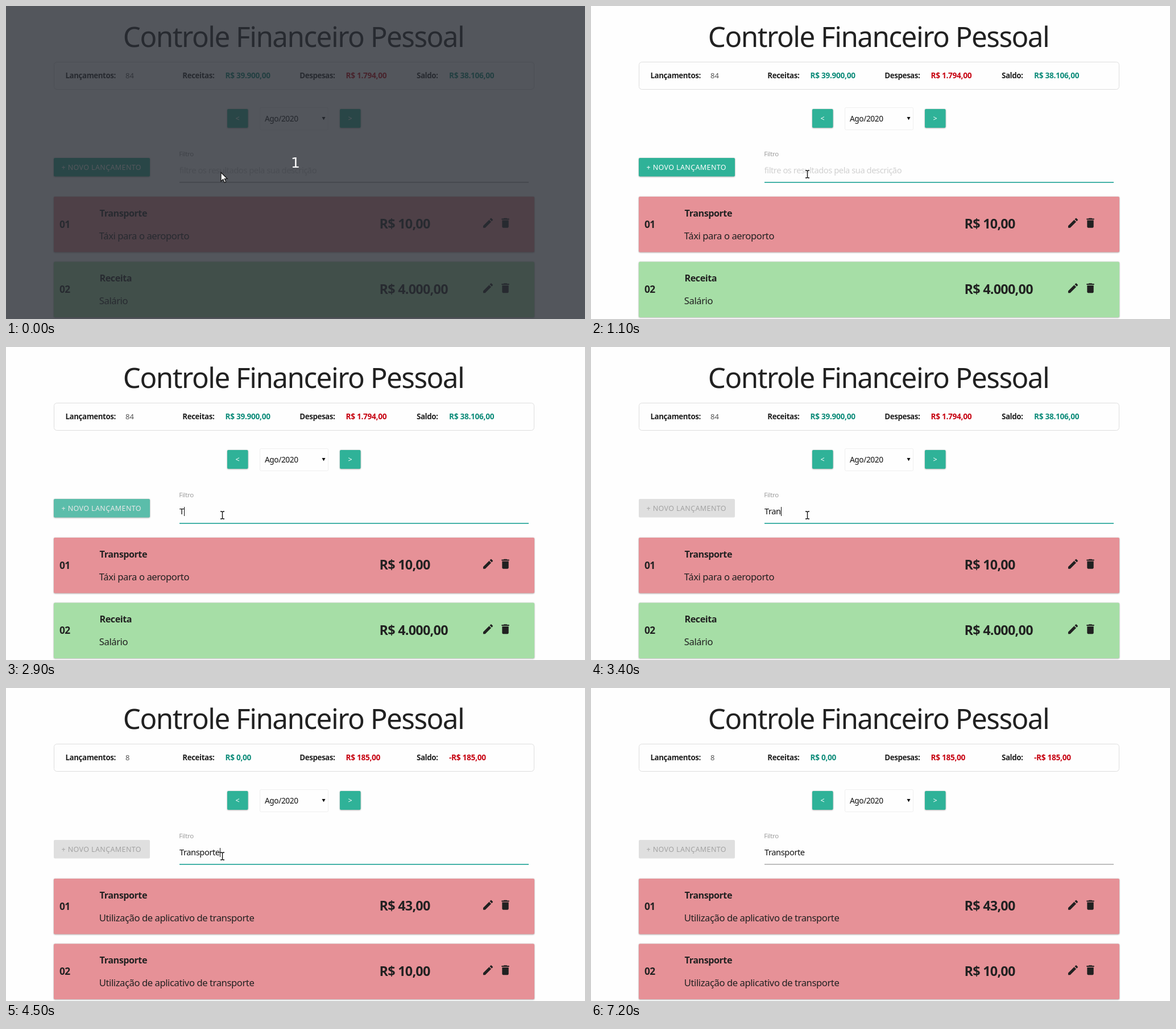
Animation of 1018 by 550 pixels, one loop 7.4 s. Source, as an HTML page:

```html
<!DOCTYPE html>
<html lang="pt-BR">
<head>
<meta charset="utf-8">
<title>Controle Financeiro Pessoal</title>
<style>
  html, body { margin: 0; width: 100%; height: 100%; overflow: hidden; background: #fefefe; }
  svg { display: block; }
  text { font-family: "Noto Sans", "Open Sans", sans-serif; letter-spacing: -.03em; fill: #212121; white-space: pre; }
  .bold, .money, .value, .index { font-weight: 700; }
  .title { font-size: 49.25px; }
  .label { font-size: 13.3px; }
  .money { font-size: 13.6px; letter-spacing: -.02em; }
  .count { font-size: 13px; letter-spacing: 0; fill: #555; }
  .button { font-size: 12.5px; letter-spacing: .03em; fill: #fff; }
  .select { font-size: 13.7px; fill: #111; }
  .hint { font-size: 11.5px; fill: #9e9e9e; }
  .input { font-size: 14.7px; fill: #111; }
  .item { font-size: 16.2px; }
  .note { font-size: 16.6px; letter-spacing: -.025em; }
  .index { font-size: 17.3px; }
  .value { font-size: 23.3px; }
  .raised { filter: drop-shadow(0 1.2px .8px #0003) drop-shadow(0 .8px 1.2px #0003); }
</style>
</head>
<body>
<svg id="stage" width="1018" height="550" viewBox="0 0 1018 550"></svg>
<script>
const TEAL = '#2fb298', GREEN = '#0c8b79', RED = '#c6000f', PINK = '#e69197', MINT = '#a6dea6';
const PENCIL = 'M3 17.25V21h3.75L17.81 9.94l-3.75-3.75L3 17.25zM20.71 7.04c.39-.39.39-1.02 0-1.41l-2.34-2.34c-.39-.39-1.02-.39-1.41 0l-1.83 1.83 3.75 3.75 1.83-1.83z';
const TRASH = 'M6 19c0 1.1.9 2 2 2h8c1.1 0 2-.9 2-2V7H6v12zM19 4h-3.5l-1-1h-5l-1 1H5v2h14V4z';
const BEAM = 'M-3.5-6.5h2.3l1.2 1 1.2-1h2.3M-3.5 6.5h2.3l1.2-1 1.2 1h2.3M0-5.5v11';
const ARROW = 'M0 0V15.5L3.7 12 6.2 17.7 8.6 16.6 6.2 11H11Z';
const stage = document.getElementById('stage');

function add(tag, attrs, parent = stage) {
  const el = document.createElementNS('http://www.w3.org/2000/svg', tag);
  set(el, attrs);
  return parent.appendChild(el);
}
function set(el, attrs) {
  for (const key in attrs) el.setAttribute(key, attrs[key]);
}
function text(cls, x, y, content = '') {
  const el = add('text', { class: cls, x, y });
  el.textContent = content;
  return el;
}
function box(x, y, width, height, fill, attrs = {}) {
  return add('rect', { x, y, width, height, fill, rx: 2, ...attrs });
}
const show = (el, on) => set(el, { visibility: on ? 'visible' : 'hidden' });
const clamp = v => Math.min(1, Math.max(0, v));
const mix = (a, b, k) => `rgb(${a.map((v, i) => Math.round(v + (b[i] - v) * k))})`;
const latest = (list, t) => list.filter(entry => entry[0] <= t).pop();

// Static page
box(0, 0, 1018, 550, '#fefefe', { rx: 0 });
text('title', 205.8, 72, 'Controle Financeiro Pessoal');
box(84.5, 98.5, 844, 48, 'none', { rx: 5, stroke: '#dedede' });
text('label bold', 104.5, 127, 'Lançamentos:');
text('label bold', 310.3, 127, 'Receitas:');
text('label bold', 516.3, 127, 'Despesas:');
text('label bold', 722, 127, 'Saldo:');
const count = text('count', 210, 127);
const sums = [385.5, 597.5, 779].map(x => text('money', x, 127));

for (const [x, sign] of [[389, '<'], [587, '>']]) {
  box(x, 181, 36.5, 33, TEAL, { class: 'raised' });
  set(text('button', x + 18.3, 202, sign), { 'text-anchor': 'middle' });
}
box(446.5, 178.5, 120, 39, 'none', { stroke: '#efefef' });
text('select', 455, 203, 'Ago/2020');
add('path', { d: 'M555.5 195h6l-3 5.5z', fill: '#111' });

const create = box(84, 267, 169, 32.5, TEAL);
const createText = text('button', 97.5, 288, '+ NOVO LANÇAMENTO');
text('hint', 304.3, 264, 'Filtro');
const placeholder = text('input', 304.7, 294, 'filtre os resultados pela sua descrição');
placeholder.style.fill = '#d0d0d0';
const typed = text('input', 305, 294);
const caret = box(305, 281, 1, 16, '#111', { rx: 0 });
const line = box(305, 309, 614, 1.5, '#9e9e9e', { rx: 0 });

const rows = [335, 449.5].map((y, i) => {
  const card = box(84, y, 845, 97.5, PINK, { class: 'raised' });
  text('index', 94, y + 54.5, '0' + (i + 1));
  [[PENCIL, 836.1], [TRASH, 866.6]].forEach(([d, x]) =>
    add('path', { d, fill: '#212121', transform: `translate(${x} ${y + 34.8}) scale(.95)` }));
  return {
    card,
    name: text('item bold', 164.6, y + 34.5),
    note: text('note', 163.8, y + 74.5),
    value: text('value', 656.5, y + 56)
  };
});

const veil = box(0, 0, 1018, 550, '#282c34', { rx: 0, opacity: .8 });
const digit = text('', 501, 284, '1');
digit.style.cssText = 'font: 25px "DejaVu Sans", sans-serif; letter-spacing: 0; fill: #fff';

const beam = add('g', { fill: 'none' });
add('path', { d: BEAM, stroke: '#fff', 'stroke-width': 3.4 }, beam);
add('path', { d: BEAM, stroke: '#111', 'stroke-width': 1.4 }, beam);
const arrow = add('path', { d: ARROW, fill: '#fff', stroke: '#111', 'stroke-width': 1.2 });

// Timed states, each starting at the given millisecond
const ride = 'Utilização de aplicativo de transporte', sale = 'Renda extra com vendas';
const results = [
  [0, 84, ['39.900', '1.794', '38.106'],
    [['Transporte', 'Táxi para o aeroporto', '10', PINK], ['Receita', 'Salário', '4.000', MINT]]],
  [3600, 17, ['0', '364', '364'],
    [['Receita', sale, '13', PINK], ['Receita', sale, '12', PINK]]],
  [3800, 8, ['0', '185', '185'],
    [['Transporte', ride, '43', PINK], ['Transporte', ride, '10', PINK]]]
];
const letters = [[0, 0], [2900, 1], [3000, 2], [3200, 3], [3400, 4], [3600, 6], [3800, 7], [4100, 9], [4500, 10]];
const blinks = [[0, 0], [500, 1], [1100, 0], [1700, 1], [2300, 0], [2900, 1], [4900, 0], [5500, 1], [6100, 0], [6700, 1], [7000, 0]];
const mouse = [
  [0, arrow, 378, 292.5], [100, beam, 380.5, 295.5], [4800, beam, 374.5, 295.5], [4900, beam, 379.5, 295.5],
  [5400, beam, 355, 283], [5500, arrow, 312, 243], [5600, arrow, 270, 208], [5700, arrow, 232.5, 178.5],
  [5800, arrow, 196, 156], [5900, arrow, 170, 142], [6100, arrow, 150, 118], [6200, arrow, 116, 68],
  [6300, arrow, 80, 17], [6400, null, 0, 0]
];

function draw(t) {
  const [, total, amounts, items] = latest(results, t);
  count.textContent = total;
  sums.forEach((el, i) => {
    const negative = i === 2 && total !== 84;
    el.textContent = `${negative ? '-' : ''}R$ ${amounts[i]},00`;
    el.style.fill = i === 1 || negative ? RED : GREEN;
  });
  rows.forEach((row, i) => {
    const [name, note, value, fill] = items[i];
    row.name.textContent = name;
    row.note.textContent = note;
    row.value.textContent = `R$ ${value},00`;
    set(row.card, { fill });
  });

  const length = latest(letters, t)[1];
  typed.textContent = 'Transporte'.slice(0, length);
  show(placeholder, !length);
  show(caret, latest(blinks, t)[1]);
  set(caret, { x: Math.round(305 + (length ? typed.getComputedTextLength() : 0)) });

  const focus = t < 7000 ? clamp((t - 400) / 400) : clamp((7200 - t) / 300);
  set(line, { fill: mix([170, 170, 170], [38, 166, 154], focus), height: 1.5 + focus * .2 });

  const off = clamp((t - 2800) / 400);
  set(create, { fill: mix([47, 178, 152], [223, 223, 223], off), class: off < .5 ? 'raised' : '' });
  createText.style.fill = mix([255, 255, 255], [163, 163, 163], off);

  show(veil, t < 100);
  show(digit, t < 100);
  const [, shape, x, y] = latest(mouse, t);
  for (const el of [beam, arrow]) {
    show(el, el === shape);
    set(el, { transform: `translate(${x} ${y})` });
  }
}

function tick() {
  const t = performance.now() % 7400;
  draw(Math.floor(t / 100) * 100);
  requestAnimationFrame(tick);
}
tick();
</script>
</body>
</html>
```
